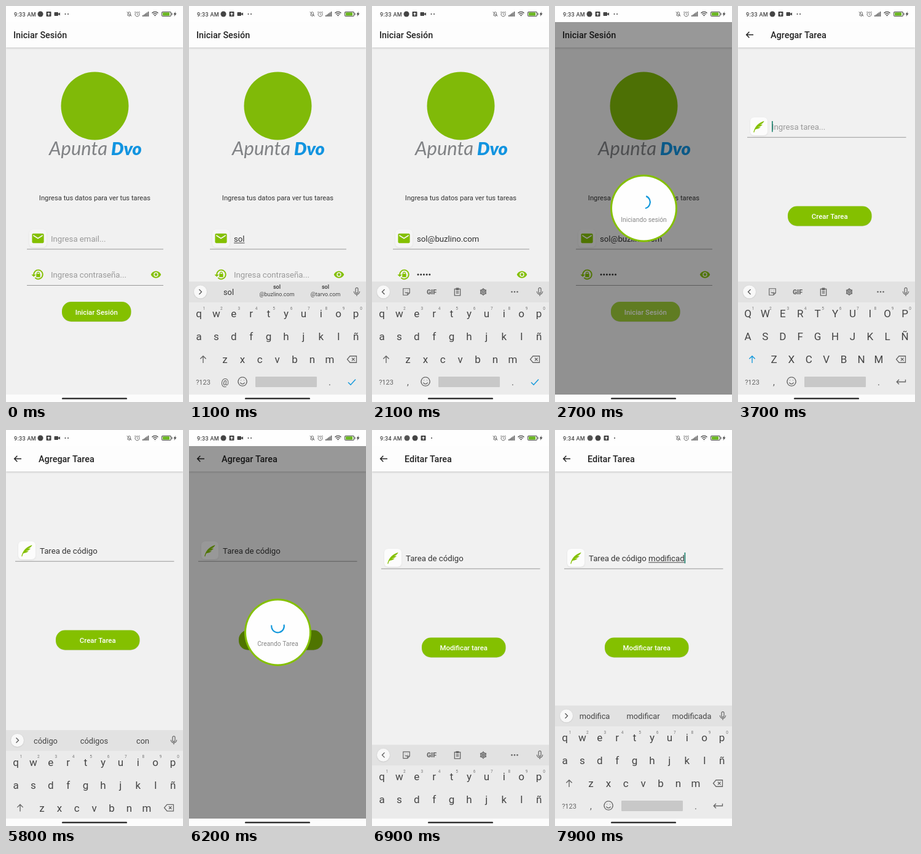
Recreate the animation shown at these times as an HTML page with a canvas. Size 288 by 640 pixels, loop 8000 ms.

```html
<!DOCTYPE html>
<html lang="es">
<head>
<meta charset="utf-8">
<title>Lista de tareas</title>
<style>
html, body { margin: 0; width: 100%; height: 100%; overflow: hidden; background: #fff; }
canvas { display: block; width: 288px; height: 640px; }
</style>
</head>
<body>
<canvas id="stage"></canvas>
<script>
const W = 288, H = 640, LOOP = 8000;
const GREEN = '#84c000', BLUE = '#1499dc', INK = '#333', GREY = '#666';
const stage = document.getElementById('stage');
const ratio = window.devicePixelRatio || 1;
stage.width = W * ratio;
stage.height = H * ratio;
const c = stage.getContext('2d');

const ICONS = {
  mail: 'M20 4H4c-1.1 0-2 .9-2 2v12c0 1.1.9 2 2 2h16c1.1 0 2-.9 2-2V6c0-1.1-.9-2-2-2zm0 4l-8 5-8-5V6l8 5 8-5z',
  eye: 'M12 4.5C7 4.5 2.7 7.6 1 12c1.7 4.4 6 7.5 11 7.5s9.3-3.1 11-7.5c-1.7-4.4-6-7.5-11-7.5zM12 17a5 5 0 1 1 0-10a5 5 0 1 1 0 10zm0-8a3 3 0 1 0 0 6a3 3 0 1 0 0-6z',
  feather: 'M2 23C4 14 10 5 23 1C21 5 19 7 15 8L20 8C17 11 14 12 10 12.5L16 13C13 16 9 16.5 6 17Q4 19 3.5 23z',
  reset: 'M13 3a9 9 0 0 0-9 9H1l4 4l4-4H6a7 7 0 1 1 2.1 5l-1.4 1.4A9 9 0 1 0 13 3zM9.500 11h.8V9.700a2.700 2.700 0 0 1 5.400 0V11h.8v5.500h-7zM11.700 11h2.600V9.700a1.300 1.300 0 0 0-2.600 0z',
  bell: 'M5 17h14l-2-3V9a5 5 0 0 0-10 0v5zM3 3l18 18M10 21h4',
  alarm: 'M12 5a8 8 0 1 0 .1 0M12 9v4l3 2M2 6l4-3M22 6l-4-3',
  wifi: 'M2 9a14 14 0 0 1 20 0M5.5 13a9 9 0 0 1 13 0M9 17a4 4 0 0 1 6 0M12 20v.5',
  back: 'M21 12H4M11 5l-7 7l7 7',
  up: 'M12 21V4M5 11l7-7l7 7',
  erase: 'M8 5h14v14H8l-6-7zM12 9l6 6M18 9l-6 6',
  enter: 'M22 7v5H3M8 7l-5 5l5 5',
  check: 'M3 13l6 6L21 6',
  smile: 'M12 2a10 10 0 1 0 .1 0M7 14a5.4 5.4 0 0 0 10 0M8.5 8.5v1M15.5 8.5v1',
  mic: 'M9 5a3 3 0 0 1 6 0v7a3 3 0 0 1-6 0zM5 11a7 7 0 0 0 14 0M12 18v4',
  sticker: 'M3 3h18v12l-6 6H3zM21 15h-6v6M8 8v1M15 8v1M8 13a5 5 0 0 0 7 0',
  clip: 'M4 4h16v18H4zM9 2h6v4H9zM8 11h8M8 15h8',
  gear: 'M12 5a7 7 0 1 0 .1 0M12 9a3 3 0 1 0 .1 0M12 2v3M12 19v3M3.5 7l3 1.7M17.5 15.3l3 1.7M3.5 17l3-1.7M17.5 8.7l3-1.7'
};

function rect(x, y, w, h, color, r = 0) {
  c.fillStyle = color;
  c.beginPath();
  c.roundRect(x, y, w, h, r);
  c.fill();
}
function disc(x, y, r, color) {
  c.fillStyle = color;
  c.beginPath();
  c.arc(x, y, r, 0, 7);
  c.fill();
}
function text(s, x, y, size, color = INK, font = '400', align = 'left', family = 'Roboto') {
  c.font = `${font} ${size}px ${family}, sans-serif`;
  c.fillStyle = color;
  c.textAlign = align;
  c.fillText(s, x, y);
}
const mid = (s, x, y, size, color, font) => text(s, x, y, size, color, font, 'center');

// Icons live on a 24-unit grid; a line width draws them as outlines.
function icon(name, x, y, size, color = GREY, line = 0) {
  const path = new Path2D(ICONS[name]);
  c.save();
  c.translate(x - size / 2, y - size / 2);
  c.scale(size / 24, size / 24);
  if (line) {
    c.strokeStyle = color;
    c.lineWidth = line;
    c.stroke(path);
  } else {
    c.fillStyle = color;
    c.fill(path, 'evenodd');
  }
  c.restore();
}
function shadow(blur, y, alpha, draw) {
  c.save();
  c.shadowColor = `rgba(0,0,0,${alpha})`;
  c.shadowBlur = blur * ratio;
  c.shadowOffsetY = y * ratio;
  draw();
  c.restore();
}

const ease = (t, from, to) => {
  const p = Math.min(1, Math.max(0, (t - from) / (to - from)));
  return p * p * (3 - 2 * p);
};
const typed = (s, t, from, step) => s.slice(0, Math.max(0, Math.floor((t - from) / step) + 1));
const cursorOn = t => (t + 950) % 1000 >= 500;

function statusBar(late) {
  rect(0, 0, W, 26, '#fefefe');
  c.letterSpacing = '.3px';
  text(late ? '9:34 AM' : '9:33 AM', 13, 16.5, 9, '#444', '500');
  c.letterSpacing = '0px';
  const x = late ? 70 : 56;
  if (late) disc(57, 13, 4.5, '#555');
  disc(x, 13, 4.5, '#444');
  rect(x + 9.5, 9, 8, 8, '#444', 1);
  c.fillStyle = '#fff';
  c.fill(new Path2D(`M${x + 13.5} 10.5l2.5 2.5h-1.7v2.5h-1.6v-2.5h-1.7z`));
  if (!late) {
    rect(78.5, 10, 6.5, 6, '#444', 1);
    c.fill(new Path2D('M85 12.5l3-2v5l-3-2z'));
  }
  for (const d of late ? [97] : [96.5, 101]) disc(d, 13, 1, '#444');
  icon('bell', 200.5, 13, 10, '#555', 2);
  icon('alarm', 213.5, 13, 10.5, '#555', 2);
  for (let i = 0; i < 5; i++) rect(222 + i * 2.2, 15 - i * 1.5, 1.5, 2 + i * 1.5, '#555');
  icon('wifi', 242.5, 13, 12, '#444', 2.5);
  rect(253, 9, 16, 8, '#555', 2);
  rect(254, 10, 14, 6, '#e8f3dc', 1.5);
  rect(255, 10.5, 11, 5, '#68b51e', 1);
  rect(269.5, 11.5, 1.2, 3, '#555');
  c.fillStyle = '#444';
  c.fill(new Path2D('M276 9l-3.5 4.5h2l-.8 3.5l3.8-5h-2.2z'));
}

function appBar(title, back) {
  rect(0, 26, W, 614, '#f1f1f1');
  shadow(3, 1, .2, () => rect(0, 26, W, 41, '#fdfdfd'));
  if (back) icon('back', 19, 46.5, 16, '#222', 2.2);
  text(title, back ? 53 : 12, 52, 14.4, '#222', '500');
}
const iconBox = (x, y, color) =>
  shadow(3, 1, .07, () => rect(x, y, 28, 29, color, 6));

function button(label, x, y, w) {
  shadow(1, .5, .12, () => rect(x, y, w, 32, GREEN, 15));
  mid(label, x + w / 2, y + 20.8, 11.4, '#fff', '500');
}

// Typed text with underlined current word and optional cursor.
function field(value, hint, x, y, size, active, cursor) {
  text(value || hint, x, y, size, value ? INK : '#999');
  const end = x + (value ? c.measureText(value).width : 0);
  const word = value.split(' ').pop();
  if (active && word && !word.includes('@'))
    rect(end - c.measureText(word).width, y + 2, c.measureText(word).width, 1, '#444');
  if (active && cursor) rect(end, y - 13.5, 1.6, 17.5, '#15806b');
}

function login(t) {
  const email = t < 1400 ? typed('sol', t, 800, 100) : 'sol@buzlino.com';
  const dots = t < 1700 ? 0 : Math.min(6, Math.floor((t - 1700) / 100) + 1);
  appBar('Iniciar Sesión');
  disc(144.5, 161.5, 55, '#80ba08');
  text('Apunta', 70, 240.5, 31, '#808285', 'italic 400', 'left', 'Lato');
  text('Dvo', 171, 240.5, 29, '#1294e0', 'italic 900', 'left', 'Lato');
  mid('Ingresa tus datos para ver tus tareas', 144.5, 314, 11.2);

  iconBox(38, 361, '#f5f5f5');
  icon('mail', 52, 375.5, 23, GREEN);
  field(email, 'Ingresa email...', 73, 380.5, 13.2, t > 300 && t < 1600, cursorOn(t));
  rect(34, 392.5, 222, 1, '#999');

  icon('reset', 51.5, 434, 22, GREEN);
  if (dots) for (let i = 0; i < dots; i++) disc(75 + i * 4.7, 434, 1.5, INK);
  else text('Ingresa contraseña...', 73, 438.5, 13.2, '#999');
  if (t >= 1600 && t < 2350 && cursorOn(t)) rect(74 + dots * 4.7, 425.5, 1.6, 17, '#15806b');
  icon('eye', 244, 434, 18, GREEN);
  rect(34, 451, 222, 1, '#999');
  button('Iniciar Sesión', 91, 478, 112.5);
  // Pressed highlight
  if (t >= 2500) rect(91, 478, 112.5, 32, 'rgba(255,255,255,.22)', 15);
}

function taskForm(title, label, value, dy, active, t) {
  appBar(title, true);
  iconBox(20, 180 + dy, '#fcfcfc');
  icon('feather', 33.5, 195 + dy, 20, GREEN);
  field(value, 'Ingresa tarea...', 55, 199.5 + dy, 13.2, active, cursorOn(t));
  rect(15, 211.7 + dy, 258.5, 1, '#999');
  button(label, 81, 323.5 + dy, 136.5);
}

// Keyboard: words fill the strip, otherwise it shows its tools.
function keyboard(shown, { words, caps, mail, done }) {
  if (shown <= 0) return;
  const key = (s, x, y) => mid(caps ? s.toUpperCase() : s, x, y, 17, '#444');
  c.save();
  c.beginPath();
  c.rect(0, 0, W, 628);
  c.clip();
  c.translate(0, (1 - shown) * 183);
  rect(0, 445.5, W, 183, '#ebebeb');
  rect(0, 445.5, W, 33.5, '#e2e2e2');
  shadow(2, .5, .15, () => disc(18.5, 462, 10.5, '#f8f8f8'));
  c.strokeStyle = '#555';
  c.lineWidth = 1.3;
  c.stroke(new Path2D(words ? 'M16.5 458l4 4l-4 4' : 'M20.5 458l-4 4l4 4'));
  if (mail && words) {
    mid('sol', 64.5, 467, 12.8);
    ['@buzlino.com', '@tarvo.com'].forEach((host, i) => {
      mid('sol', 143 + i * 79, 457, 9, INK, '500');
      mid(host, 143 + i * 79, 468.5, 9, '#444');
    });
  } else if (words) {
    words.forEach((word, i) => mid(word, 64.5 + i * 79, 467, 12.8, '#444'));
  } else {
    icon('sticker', 56, 462, 14, GREY, 2);
    mid('GIF', 97, 466, 10.5, GREY, '900');
    icon('clip', 139, 462, 14, GREY, 2.2);
    icon('gear', 181, 462, 14, GREY, 2.8);
    for (const x of [227.5, 232, 236.5]) disc(x, 462, 1.3, GREY);
  }
  icon('mic', 273, 462, 16, GREY, 1.8);

  [...'qwertyuiop'].forEach((s, i) => {
    key(s, 16 + i * 28.4, 503);
    mid((i + 1) % 10, 24.5 + i * 28.4, 490.5, 6.5, '#777');
  });
  [...'asdfghjklñ'].forEach((s, i) => key(s, 16 + i * 28.4, 540));
  [...'zxcvbnm'].forEach((s, i) => key(s, 58.5 + i * 28.4, 577));
  icon('up', 23, 571, 16, caps ? BLUE : GREY, 2);
  icon('erase', 265, 571, 18, GREY, 1.7);
  mid('?123', 23, 611.5, 11, GREY);
  mid(mail ? '@' : ',', 58.5, 612.5, 14, '#555');
  icon('smile', 87, 607, 17, GREY, 1.8);
  rect(108, 599, 100, 17, '#c8c8c8', 1);
  mid('.', 229, 612.5, 15, '#555');
  if (done) icon('check', 265, 607.5, 16, BLUE, 2.2);
  else icon('enter', 265, 607.5, 18, GREY, 1.8);
  c.restore();
}

// The spinner turns steadily while its arc grows and shrinks.
function dialog(label, age) {
  rect(0, 26, W, 602, 'rgba(0,0,0,.4)');
  disc(144.5, 327, 54.5, GREEN);
  disc(144.5, 327, 51.5, '#fefefe');
  const rad = Math.PI / 180;
  const start = (.55 * age - 152) * rad;
  const sweep = (145 + 125 * Math.sin((age - 150) / 1333 * 2 * Math.PI)) * rad;
  c.strokeStyle = BLUE;
  c.lineWidth = 2.2;
  c.beginPath();
  c.arc(144.5, 317, 10.3, start, start + sweep);
  c.stroke();
  mid(label, 144.5, 348.5, 10.3, '#888');
}

function addText(t) {
  if (t < 5200) return typed('Tarea en ', t, 3900, 120);
  if (t < 5350) return 'Tarea ' + 'en '.slice(0, Math.max(0, 2 - Math.floor((t - 5200) / 50)));
  return 'Tarea ' + typed('de código', t, 5350, 45);
}
function suggestions(value) {
  if (!value) return null;
  const word = value.split(' ').pop();
  if (!word) return ['el', 'la', 'mi'];
  if (word[0] === 'T') return ['Tarea', 'Tareas', 'Tarde'];
  if (word[0] === 'm') return ['modifica', 'modificar', 'modificada'];
  return word[0] === 'c' ? ['código', 'códigos', 'con'] : ['de', 'en', 'del'];
}

function draw(t) {
  c.setTransform(ratio, 0, 0, ratio, 0, 0);
  if (t < 3100) {
    login(t);
    keyboard(ease(t, 300, 600) - ease(t, 2300, 2500),
      { words: t >= 800 && t < 1400, mail: t < 1600, done: true });
    if (t >= 2550) dialog('Iniciando sesión', t - 2550);
  } else if (t < 6600) {
    const value = addText(t);
    taskForm('Agregar Tarea', 'Crear Tarea', value, 0, t > 3300 && t < 5800, t);
    keyboard(ease(t, 3300, 3600) - ease(t, 5750, 5920),
      { words: suggestions(value), caps: !value });
    if (t >= 5950) dialog('Creando Tarea', t - 5950);
  } else {
    const extra = typed(' modificad', t, 7200, 65);
    taskForm('Editar Tarea', 'Modificar tarea', 'Tarea de código' + extra, 12, extra.length > 0, t);
    keyboard(ease(t, 6750, 7000), { words: extra ? suggestions(extra) : null });
  }
  statusBar(t >= 6600);
  rect(0, 628, W, 12, '#fcfcfc');
  rect(91, 633.2, 106, 2.4, '#222', 1.2);
}

function tick() {
  draw(performance.now() % LOOP);
  requestAnimationFrame(tick);
}
tick();
</script>
</body>
</html>
```
